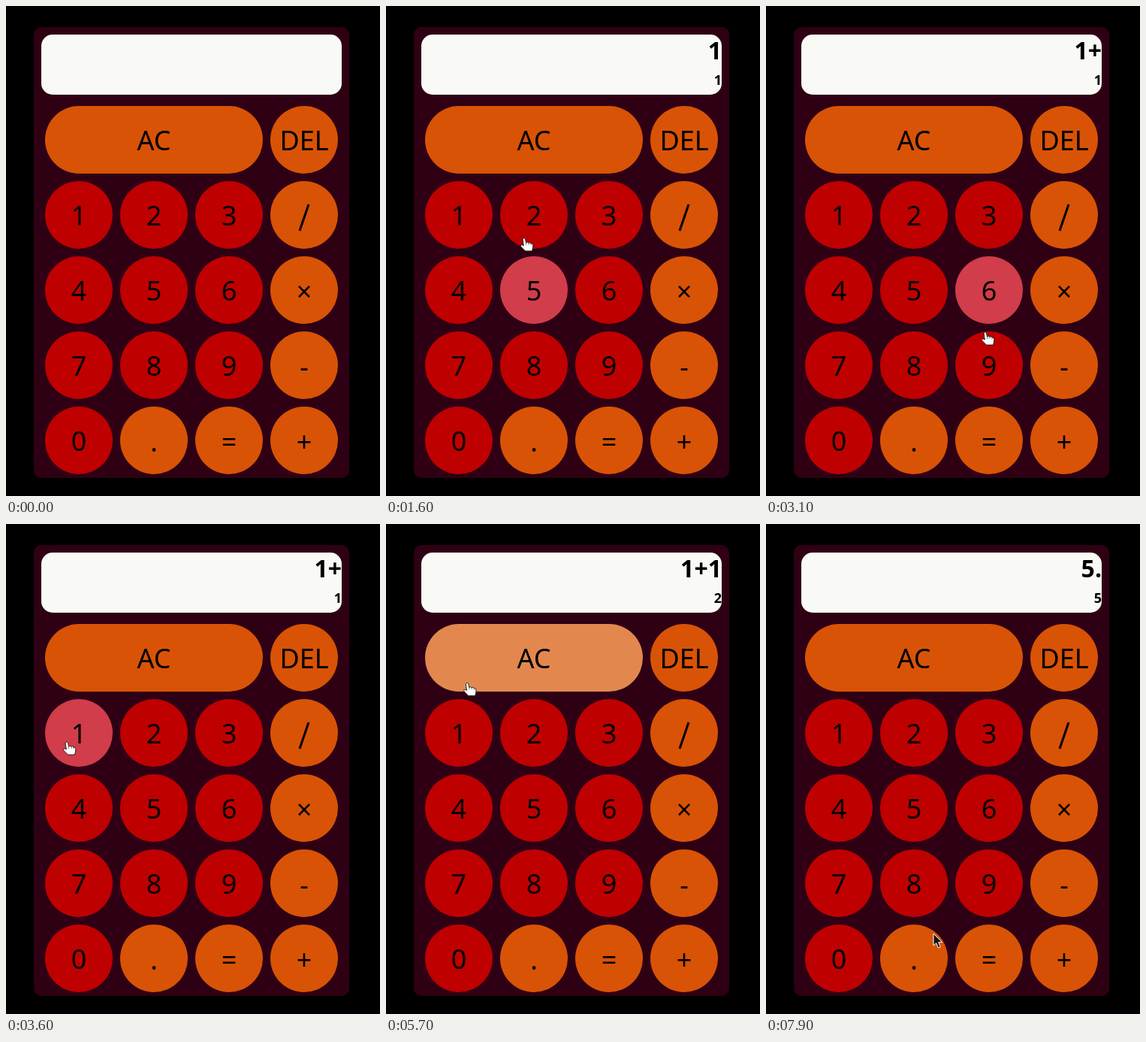
Animation of 498 by 652 pixels, one loop 8 s. Source, as an HTML page with a canvas:

```html
<!DOCTYPE html>
<html lang="en">
<head>
<meta charset="utf-8">
<title>Calculator</title>
<style>
html, body { margin: 0; width: 100%; height: 100%; overflow: hidden; background: #000; }
canvas { display: block; }
</style>
</head>
<body>
<canvas id="stage" width="498" height="652"></canvas>
<script>
const ctx = document.getElementById('stage').getContext('2d');
const LOOP = 8000, STEP = 100;
const ENTER = 500, LEAVE = 7900; // pointer appears, pointer goes idle
const LEAD = 70;                 // highlights run slightly ahead of the pointer
const R = 45;
const FONT = '"Noto Sans", "Open Sans", sans-serif';
const RED = { base: '#bf0000', lit: '#d13d4a' };
const ORANGE = { base: '#d95306', lit: '#e2884f' };

const keys = [
  { label: 'AC', x: 52, y: 133, w: 290, tone: ORANGE },
  { label: 'DEL', x: 352, y: 133, w: 90, tone: ORANGE }
];
['123/', '456×', '789-', '0.=+'].forEach((row, r) => [...row].forEach((label, c) => keys.push({
  label, x: 52 + 100 * c, y: 233 + 100 * r, w: 90,
  tone: /\d/.test(label) ? RED : ORANGE
})));

// Waypoints of the pointer tip: time, x, y
const path = [
  [ENTER, 20, 349], [900, 130, 298], [1200, 130, 298], [1600, 184, 309],
  [2000, 372, 478], [2200, 380, 484], [2600, 388, 570], [2900, 388, 570],
  [3100, 292, 434], [3200, 255, 385], [3600, 81, 290], [5000, 81, 290],
  [5900, 116, 189], [6200, 108, 284], [6500, 108, 284], [6600, 131, 323],
  [7000, 188, 376], [7400, 223, 570], [7600, 223, 545]
];
const taps = [1200, 2600, 3900, 5800, 7000, 7600];

const hand = new Path2D('M-2 1Q0-1.5 1.5 1L2.5 6Q4.5 4.5 6 6.3Q8 5 9 7Q11.5 6.5 11.8 9.5L11.5 13L10.5 17H1.5L-4 11.5Q-5.5 8.5-2.5 9L-.7 10Z');
const knuckles = new Path2D('M2.5 6V9M6 6.5V9M9 7V9.5');
const arrow = new Path2D('M0 0V16L3.7 12.6L6.5 19L9.3 17.8L6.6 11.6H11.5Z');

const clamp = (v, lo, hi) => Math.min(Math.max(v, lo), hi);

function pointerAt(t) {
  const i = path.findIndex(p => p[0] > t);
  if (i <= 0) return path.at(i).slice(1); // before the first or after the last point
  const [t0, x0, y0] = path[i - 1], [t1, x1, y1] = path[i];
  const k = (t - t0) / (t1 - t0);
  return [x0 + (x1 - x0) * k, y0 + (y1 - y0) * k];
}

function keyAt(t) {
  const [x, y] = pointerAt(t);
  return keys.find(k => Math.hypot(x - clamp(x, k.x + R, k.x + k.w - R), y - k.y - R) < R);
}

// Type every key tapped so far
function entryAt(t) {
  return taps.filter(tap => tap <= t).reduce((text, tap) => {
    const { label } = keyAt(tap);
    return label === 'AC' ? '' : text + label;
  }, '');
}

const total = entry => entry && String(entry.split('+').reduce((sum, n) => sum + Number(n), 0));

function box(x, y, w, h, r, color) {
  ctx.fillStyle = color;
  ctx.beginPath();
  ctx.roundRect(x, y, w, h, r);
  ctx.fill();
}

function write(text, x, y, font, align) {
  ctx.font = font + ' ' + FONT;
  ctx.textAlign = align;
  ctx.fillStyle = '#000';
  ctx.fillText(text, x, y);
}

function drawKey(key, lit) {
  box(key.x, key.y, key.w, 2 * R, R, lit ? key.tone.lit : key.tone.base);
  const mid = key.x + key.w / 2;
  if (key.label !== '/') {
    const base = /\w/.test(key.label) ? 59 : 60;
    write(key.label, mid, key.y + base, '36px', 'center');
    return;
  }
  // A tall, narrow division bar
  ctx.strokeStyle = '#000';
  ctx.lineWidth = 3;
  ctx.beginPath();
  ctx.moveTo(mid + 6, key.y + 31);
  ctx.lineTo(mid - 6, key.y + 66);
  ctx.stroke();
}

function drawPointer(t) {
  if (t < ENTER) return;
  const isHand = t >= ENTER + 200 && t < LEAVE;
  const shape = isHand ? hand : arrow;
  ctx.save();
  ctx.translate(...pointerAt(t));
  ctx.lineJoin = 'round';
  ctx.lineWidth = 1;
  ctx.fillStyle = isHand ? '#fff' : '#111';
  ctx.strokeStyle = isHand ? '#222' : '#fff';
  ctx.fill(shape);
  ctx.stroke(shape);
  if (isHand) {
    ctx.lineWidth = 0.6;
    ctx.stroke(knuckles);
  }
  ctx.restore();
}

function draw(t) {
  ctx.fillStyle = '#000';
  ctx.fillRect(0, 0, 498, 652);
  box(37, 28, 420, 600, 10, '#2f0014');
  box(47, 38, 400, 80, 15, '#f9faf5');

  const entry = entryAt(t);
  write(entry, 447, 71, 'bold 32px', 'right');
  write(total(entry), 447, 105, 'bold 18px', 'right');

  const lit = t < LEAVE && keyAt(t + LEAD);
  keys.forEach(key => drawKey(key, key === lit));
  drawPointer(t);
}

function tick() {
  const t = performance.now() % LOOP;
  draw(Math.floor(t / STEP) * STEP);
  requestAnimationFrame(tick);
}
tick();
</script>
</body>
</html>
```
